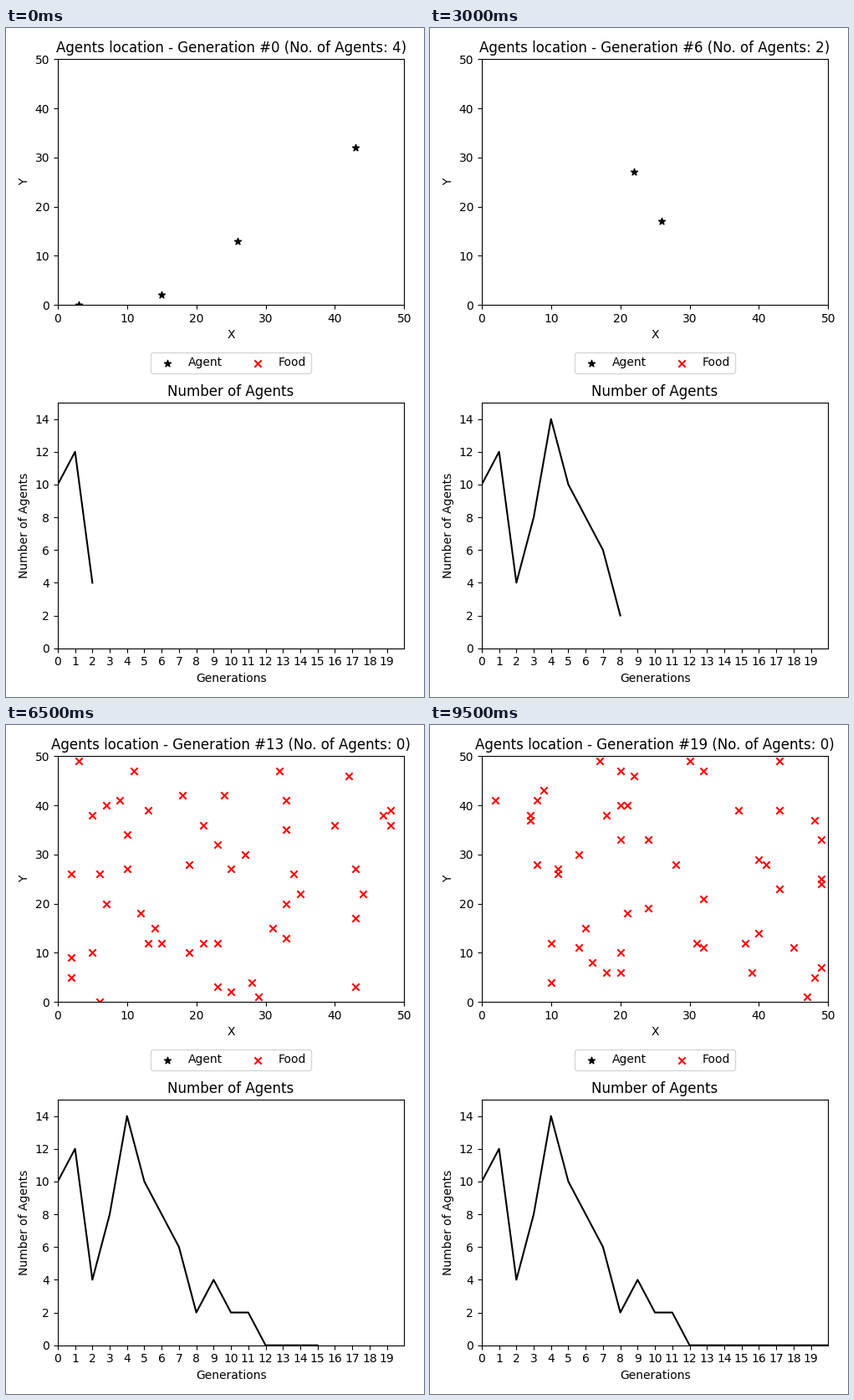
Animation, 500 px wide and 800 px high, one loop 10000 ms. Source, as a matplotlib script:

```python
import numpy as np
import matplotlib.pyplot as plt
from matplotlib.animation import FuncAnimation

GENERATIONS = 20
SIZE = 50
FOOD_COUNT = 50
# The population dies out after these counts.
HISTORY = [10, 12, 4, 8, 14, 10, 8, 6, 2, 4, 2, 2] + [0] * 10


def scatter_points(count, seed):
    rng = np.random.default_rng(seed)
    return rng.integers(0, SIZE + 1, (count, 2))


plt.rcParams["font.family"] = "DejaVu Sans"
fig, (world, chart) = plt.subplots(2, 1, figsize=(5, 8), dpi=100)

world.set(xlim=(0, SIZE), ylim=(0, SIZE), xlabel="X", ylabel="Y")
agents = world.scatter([], [], marker="*", color="black", label="Agent")
food = world.scatter([], [], marker="x", color="red", label="Food")
title = world.set_title("")
world.legend(loc="upper center", bbox_to_anchor=(0.5, -0.17), ncol=2)

chart.set(xlim=(0, GENERATIONS), ylim=(0, 15), xticks=range(GENERATIONS),
          xlabel="Generations", ylabel="Number of Agents",
          title="Number of Agents")
line, = chart.plot([], [], color="black")


def update(generation):
    # The history starts two entries before the first generation shown.
    last = generation + 2
    count = HISTORY[last]
    title.set_text(f"Agents location - Generation #{generation} "
                   f"(No. of Agents: {count})")
    agents.set_offsets(scatter_points(count, generation))
    # Food is only left over once there are no agents to eat it.
    food.set_offsets(scatter_points(0 if count else FOOD_COUNT,
                                    GENERATIONS + generation))
    line.set_data(range(last + 1), HISTORY[:last + 1])
    return agents, food, title, line


update(0)
fig.tight_layout()
animation = FuncAnimation(fig, update, frames=GENERATIONS, interval=500,
                          repeat=True, repeat_delay=0)
plt.show()
```
